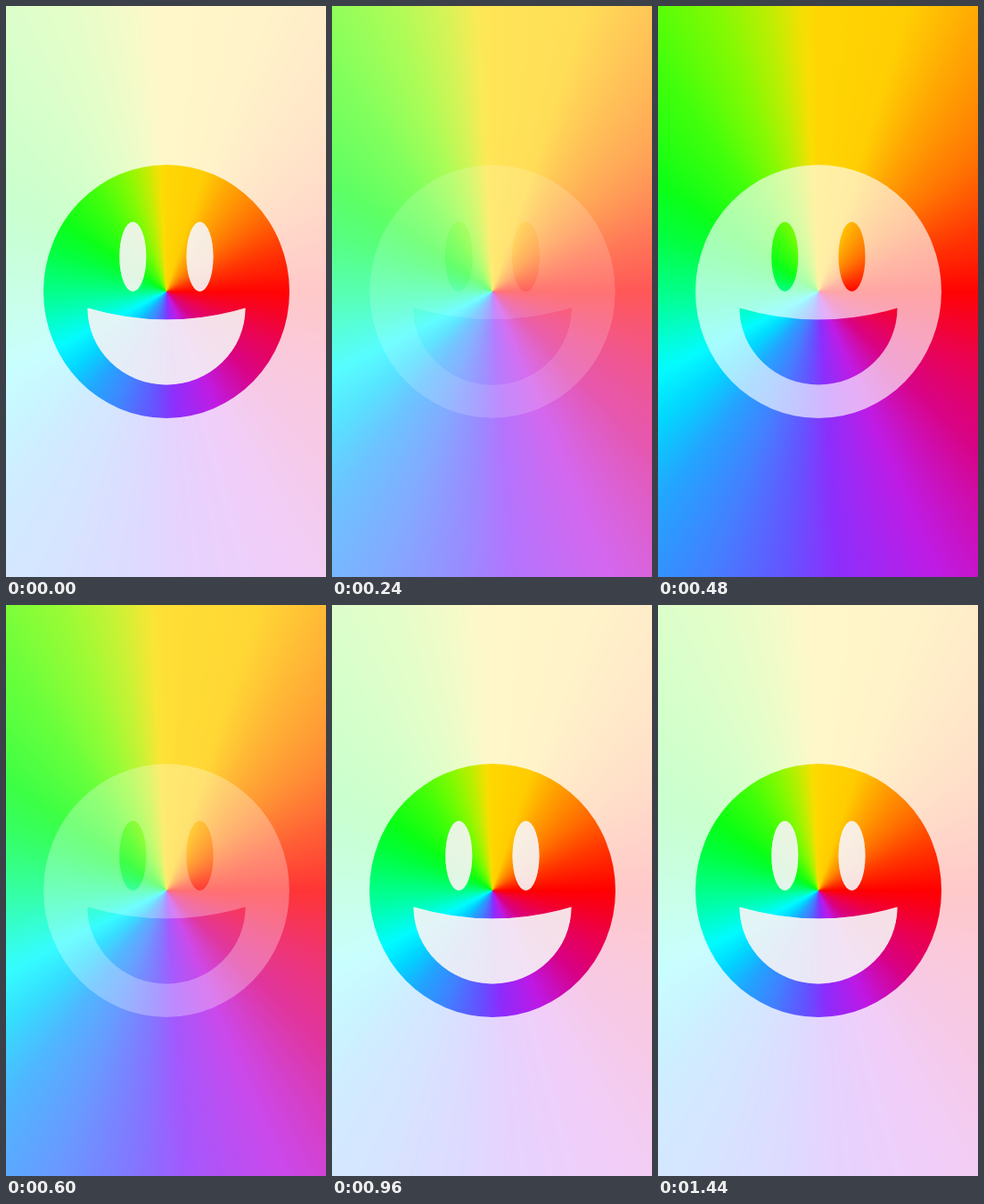
Write an HTML page that moves like this. It is 359 by 640 pixels and loops after 1.47 s.

```html
<!DOCTYPE html>
<html lang="en">
<head>
<meta charset="utf-8">
<title>Rainbow smiley</title>
<style>
html, body { margin: 0; width: 100%; height: 100%; overflow: hidden; }
svg {
  display: block; width: 359px; height: 640px;
  background: conic-gradient(at 180px 320px,
    #ffd600, #ffcc00 18deg, #ffa600 30deg, #ff7000 50deg, #ff3800 68deg,
    #f00 90deg, #ea0050 115deg, #d80084 135deg, #be18e4 157deg,
    #8c2cfc 176deg, #6450ff 186deg, #4080ff 202deg, #20a4ff 217deg,
    #00d4ff 230deg, #00fbff 243deg, #00ff90 268deg, #00ff3c 290deg,
    #08ff14 304deg, #40ff08 325deg, #80fa00 340deg, #bcee00 350deg,
    #f8de00 357deg, #ffd600);
}
</style>
</head>
<body>
<svg viewBox="0 0 359 640" fill="#fff" fill-rule="evenodd">
  <path id="backdrop"/>
  <path id="face"/>
  <path id="features" fill="#f3f0f2"/>
</svg>
<script>
const PERIOD = 1470, RISE_START = -10, PEAK = 450, FALL_END = 900;
const FACE_LEAD = 30;
const [backdrop, face, features] =
  ['backdrop', 'face', 'features'].map(id => document.getElementById(id));

const ellipse = (cx, cy, rx, ry) =>
  `M${cx - rx} ${cy}a${rx} ${ry} 0 1 0 ${2 * rx} 0a${rx} ${ry} 0 1 0 ${-2 * rx} 0z`;
const disc = ellipse(180, 320, 138, 142);
const holes = ellipse(142.3, 281, 15, 39) + ellipse(217.5, 281, 15, 39) +
  'M91.5 338.5Q180 364.5 268.5 338.5A88.5 86 0 0 1 91.5 338.5z';

backdrop.setAttribute('d', 'M0 0H359V640H0z' + disc + holes);
face.setAttribute('d', disc + holes);
features.setAttribute('d', holes);

const smooth = x => {
  x = Math.min(1, Math.max(0, x));
  return x * x * (3 - 2 * x);
};

// 0: coloured face on a pale backdrop, 1: pale face on a coloured backdrop
function swapAt(time) {
  let t = time % PERIOD;
  if (t >= PERIOD + RISE_START) t -= PERIOD;
  return t < PEAK
    ? smooth((t - RISE_START) / (PEAK - RISE_START))
    : smooth((FALL_END - t) / (FALL_END - PEAK));
}

function draw(time) {
  const swap = swapAt(time);
  backdrop.style.opacity = 0.79 * (1 - swap);
  face.style.opacity = 0.68 * swapAt(time + FACE_LEAD);
  features.style.opacity = 0.6 * (1 - swap) ** 3;
}

const start = performance.now();
function tick() {
  draw(performance.now() - start);
  requestAnimationFrame(tick);
}
tick();
</script>
</body>
</html>
```
